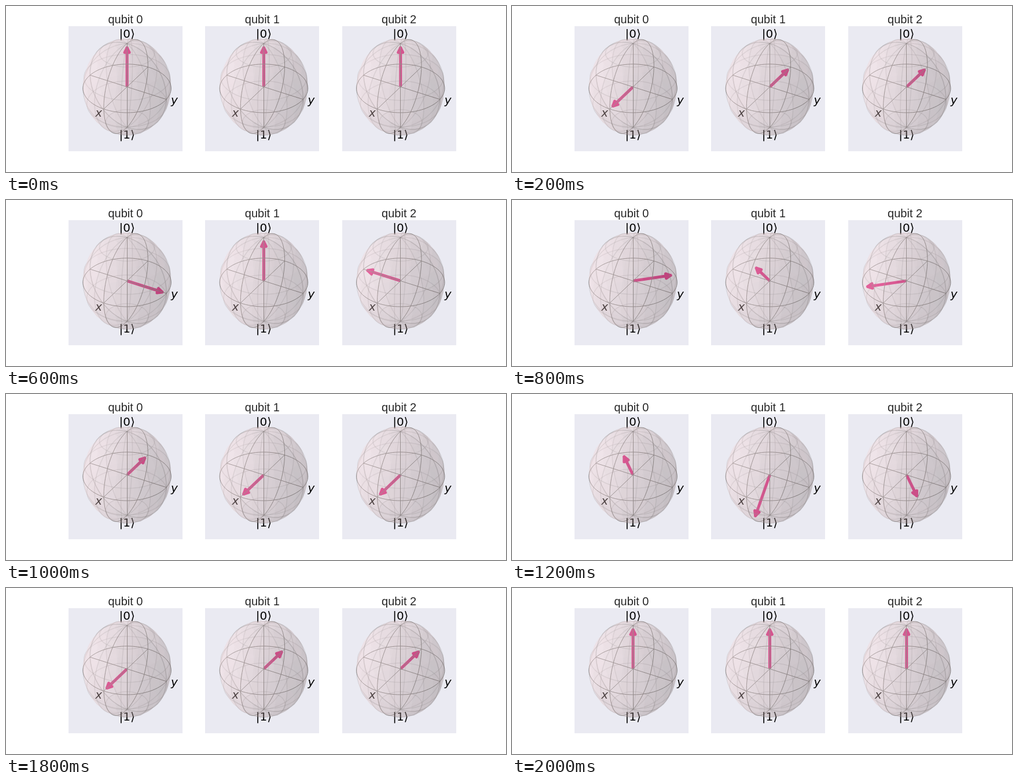
Recreate the animation shown at these times as an HTML page with a canvas. Size 864x288 px, loop 2.2 s.

```html
<!DOCTYPE html>
<html lang="en">
<head>
<meta charset="utf-8">
<title>Three Bloch spheres</title>
<style>
  html, body { margin: 0; width: 864px; height: 288px; overflow: hidden; background: #fff; }
  canvas { display: block; }
</style>
</head>
<body>
<canvas id="stage" width="864" height="288"></canvas>
<script>
const ctx = document.getElementById('stage').getContext('2d');
const { PI, cos, sin, min, round, floor, hypot } = Math;

const STEP_MS = 200, STEPS = 11;
const PANEL = { left: 108, top: 34.56, width: 196.94, height: 217.44, pitch: 236.33 };
const SCALE_X = PANEL.width * 0.3861, SCALE_Y = PANEL.height * 0.3861;
const CENTER_X = PANEL.left + PANEL.width * 0.5135, CENTER_Y = 140.34;
const CELLS = 24; // grid cells across each half sphere, in both directions
const LIGHT = [-2 / 3, -2 / 3, 1 / 3];
const WIRE_ROWS = [0, 5, 10, 15, 20, 24];

const range = n => Array.from({ length: n }, (_, i) => i);
const depth = ([x, y, z]) => 0.433 * x - 0.75 * y + 0.5 * z;
const fromBloch = ([x, y, z]) => [y, -x, z];

// Perspective view from azimuth -60, elevation 30 degrees
function project(p) {
  const [x, y, z] = p, k = 1 / (1 - depth(p) / 14);
  return [
    CENTER_X + SCALE_X * k * (0.866 * x + 0.5 * y),
    CENTER_Y - SCALE_Y * k * (-0.25 * x + 0.433 * y + 0.866 * z)
  ];
}

function spherePoint(start, i, j) {
  const u = start + PI * i / CELLS, v = PI * j / CELLS;
  return [cos(u) * sin(v), sin(u) * sin(v), cos(v)];
}

function trace(points) {
  ctx.beginPath();
  points.forEach(p => ctx.lineTo(...p));
}

function strokeCurve(points) {
  trace(points.map(project));
  ctx.stroke();
}

function buildFaces(start) {
  const faces = [];
  for (let i = 0; i < CELLS; i += 2) {
    for (let j = 0; j < CELLS; j += 2) {
      const center = spherePoint(start, i + 1, j + 1);
      const rim = [[0, 0], [1, 0], [2, 0], [2, 1], [2, 2], [1, 2], [0, 2], [0, 1]];
      faces.push({
        depth: depth(center),
        shade: center.reduce((sum, c, n) => sum + c * LIGHT[n], 0),
        outline: rim.map(([a, b]) => project(spherePoint(start, i + a, j + b)))
      });
    }
  }
  const shades = faces.map(f => f.shade);
  const low = min(...shades), span = Math.max(...shades) - low;
  faces.forEach(f => {
    const b = 0.5 + 0.5 * (f.shade - low) / span;
    f.color = `rgba(${round(255 * b)},${round(221 * b)},${round(221 * b)},0.2)`;
  });
  return faces.sort((a, b) => a.depth - b.depth);
}

const halves = [0, -PI].map(start => ({ start, faces: buildFaces(start) }));

function drawHalf({ start, faces }) {
  ctx.strokeStyle = 'rgba(128,128,128,0.2)';
  ctx.lineWidth = 1.5;
  for (const row of WIRE_ROWS) {
    strokeCurve(range(CELLS + 1).map(n => spherePoint(start, row, n)));
    strokeCurve(range(CELLS + 1).map(n => spherePoint(start, n, row)));
  }
  for (const face of faces) {
    trace(face.outline);
    ctx.fillStyle = face.color;
    ctx.fill();
  }
}

function drawArrow(vector) {
  const [x0, y0] = project([0, 0, 0]), [x1, y1] = project(fromBloch(vector));
  const length = hypot(x1 - x0, y1 - y0);
  const dx = (x1 - x0) / length, dy = (y1 - y0) / length;
  const at = (along, side) => [x0 + dx * along - dy * side, y0 + dy * along + dx * side];
  const tip = length - 7.59;
  ctx.strokeStyle = ctx.fillStyle = '#dc267f';
  ctx.lineWidth = 5;
  ctx.lineCap = ctx.lineJoin = 'round';
  trace([at(2, 0), at(tip, 0)]);
  ctx.stroke();
  trace([at(tip - 8, 4), at(tip, 0), at(tip - 8, -4)]);
  ctx.closePath();
  ctx.fill();
  ctx.stroke();
}

function drawFrame(left) {
  ctx.strokeStyle = '#808080';
  ctx.lineWidth = 1;
  ctx.lineCap = 'butt';
  const circle = range(97).map(n => 2 * PI * n / 96);
  strokeCurve(circle.map(a => [cos(a), sin(a), 0]));
  strokeCurve(circle.map(a => [0, cos(a), sin(a)]));
  strokeCurve([[-1, 0, 0], [1, 0, 0]]);
  strokeCurve([[0, -1, 0], [0, 1, 0]]);
  // keep the vertical axis crisp on the pixel grid
  const x = floor(CENTER_X + left) + 0.5 - left;
  trace([[x, project([0, 0, 1])[1]], [x, project([0, 0, -1])[1]]]);
  ctx.stroke();
}

function label(text, x, y, font, color = '#000') {
  ctx.font = font;
  ctx.fillStyle = color;
  ctx.fillText(text, x, y);
}

function drawLabels() {
  const upright = '20px "DejaVu Sans", sans-serif', slanted = 'italic ' + upright;
  label('|0⟩', CENTER_X, 55, upright);
  label('|1⟩', CENTER_X, 230, upright);
  label('x', 160.2, 192, slanted);
  label('y', 291, 170, slanted);
}

// Up at both ends of the loop; in between each vector turns 45 degrees a step
function vectorsAt(step) {
  if (step % (STEPS - 1) === 0) return range(3).map(() => [0, 0, 1]);
  const a = (step - 1) * PI / 4;
  return [[cos(a), sin(a), 0], [-cos(a), 0, sin(a)], [-cos(a), -sin(a), 0]];
}

function drawPanel(vector, index) {
  const left = PANEL.pitch * index;
  const x0 = round(PANEL.left + left), x1 = round(PANEL.left + left + PANEL.width);
  ctx.fillStyle = '#eaeaf2';
  ctx.fillRect(x0, 35, x1 - x0, 217);
  ctx.save();
  ctx.translate(left, 0);
  label('qubit ' + index, PANEL.left + PANEL.width / 2, 30,
    '20px "Liberation Sans", Arial, sans-serif', '#262626');
  drawArrow(vector);
  drawFrame(left);
  drawLabels();
  halves.forEach(drawHalf);
  ctx.restore();
}

const startTime = performance.now();
let shownStep = -1;

function tick() {
  const step = floor((performance.now() - startTime) / STEP_MS) % STEPS;
  if (step !== shownStep) {
    shownStep = step;
    ctx.fillStyle = '#fff';
    ctx.fillRect(0, 0, 864, 288);
    ctx.textAlign = 'center';
    vectorsAt(step).forEach(drawPanel);
  }
  requestAnimationFrame(tick);
}
tick();
</script>
</body>
</html>
```
